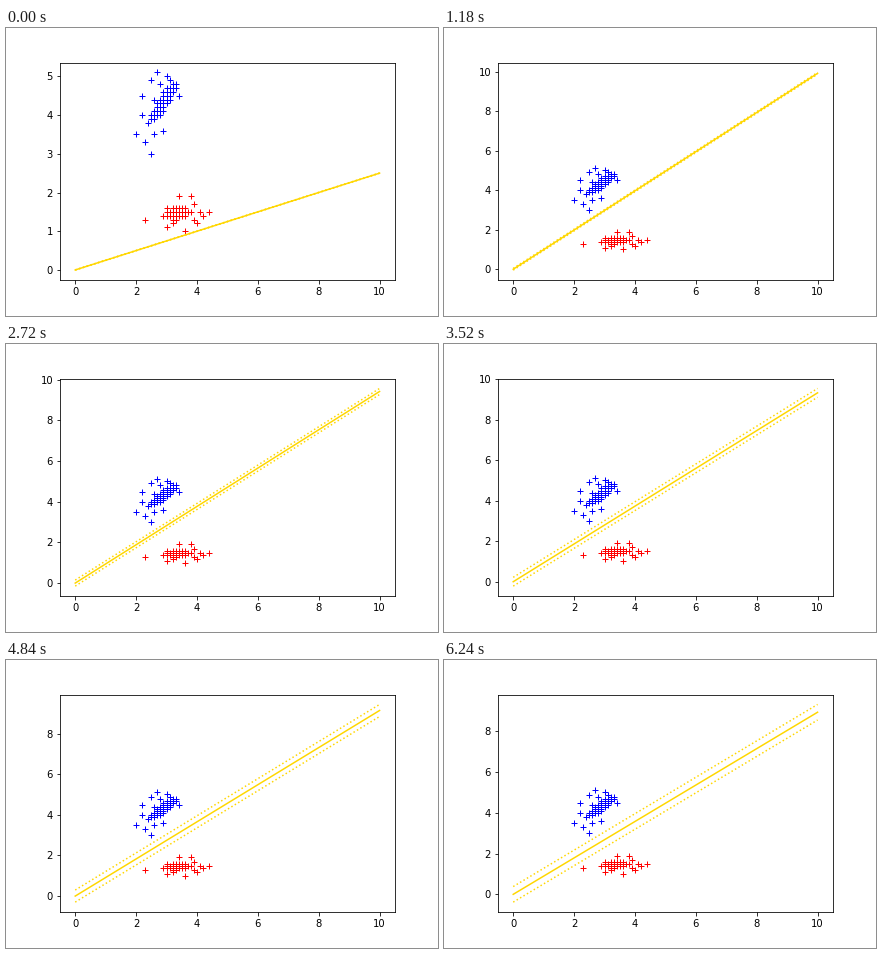
A matplotlib script that plays this animation: 432x288 px, repeating every 6340 ms.

```python
import numpy as np
import matplotlib.pyplot as plt
from matplotlib.animation import FuncAnimation

STEP = 20
LOOP = 6340
HOLD_FROM = 6240

# Key poses: time in seconds -> value
SLOPE = {0: .25, .04: .99, 1.3: .992, 2.06: .916, 2.5: .945, 3.52: .932, 6.24: .894}
MARGIN = {0: .004, 1.18: .045, 2.06: .092, 3.52: .217, 6.24: .382}


def tween(keys, t):
    return np.interp(t, list(keys), list(keys.values()))


def cloud(columns, center, tilt, height, taper, strays):
    """Tilted lens of points on a 0.1 lattice, plus a few strays."""
    cx, cy = center
    pts = set(strays)
    for x in columns:
        mid = cy + tilt * (x - cx)
        half = height - taper * abs(x - cx)
        pts |= {(x, y) for y in range(60) if abs(y - mid) <= half}
    return np.array(sorted(pts)) / 10


upper = cloud(range(24, 34), (29, 43.5), 1.05, 3, .5,
              [(20, 35), (22, 40), (22, 45), (23, 33), (25, 30), (25, 49),
               (26, 35), (26, 44), (27, 51), (28, 48), (29, 36), (30, 50),
               (31, 49), (34, 45)])
lower = cloud(range(30, 39), (33, 14.7), .1, 2, .3,
              [(23, 13), (29, 14), (30, 11), (30, 16), (32, 12), (34, 19),
               (36, 10), (38, 19), (39, 13), (39, 17), (40, 12), (41, 15),
               (42, 14), (44, 15)])

plt.rcParams.update({"font.family": "DejaVu Sans", "font.size": 10})
fig, ax = plt.subplots(figsize=(6, 4), dpi=72)
fig.subplots_adjust(left=0.125, right=0.9, bottom=0.125, top=0.88)

ax.plot(*upper.T, "+", color="blue")
ax.plot(*lower.T, "+", color="red")
xs = np.array([0.0, 10.0])
center, above, below = [ax.plot(xs, xs, style, color="gold")[0]
                        for style in ("-", ":", ":")]
ax.set_xlim(-0.5, 10.5)


def update(i):
    t = min(i * STEP, HOLD_FROM) / 1000
    margin = tween(MARGIN, t)
    line = tween(SLOPE, t) * xs
    center.set_ydata(line)
    above.set_ydata(line + margin)
    below.set_ydata(line - margin)

    low, high = -margin, max(upper[:, 1].max(), line[-1] + margin)
    pad = 0.05 * (high - low)
    ax.set_ylim(low - pad, high + pad)
    return center, above, below


anim = FuncAnimation(fig, update, frames=LOOP // STEP, interval=STEP,
                     repeat=True, repeat_delay=0, blit=False)
plt.show()
```
